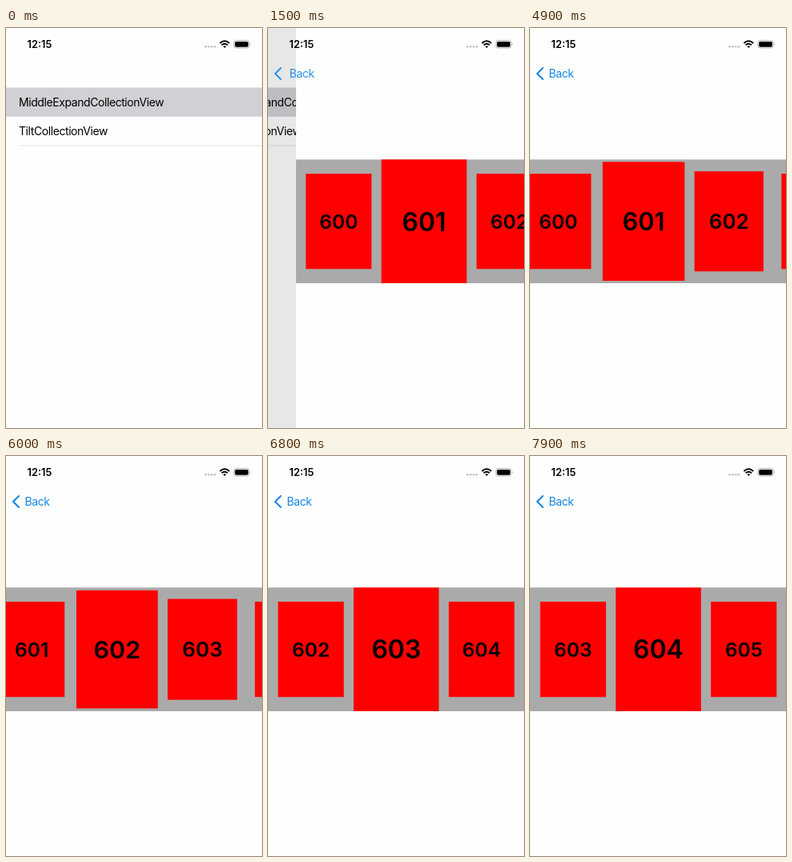
Write an HTML page that moves like this. It is 320 px wide and 500 px high and loops after 8 s.

```html
<!DOCTYPE html>
<html lang="en">
<head>
<meta charset="utf-8">
<title>Collection view demo</title>
<style>
  html, body { margin: 0; width: 100%; height: 100%; overflow: hidden; background: #fefefe; }
  svg { display: block; width: 320px; height: 500px; }
  text { font: 14px Inter, sans-serif; letter-spacing: -.42px; }
  .clock { font-size: 12.8px; font-weight: 600; letter-spacing: 0; }
  .card text { font-size: 32px; font-weight: 600; letter-spacing: 0; text-anchor: middle; }
  .card rect { fill: #f00; }
  .back { fill: #1486e6; }
</style>
</head>
<body>
<svg viewBox="0 0 320 500">
  <rect width="320" height="500" fill="#fefefe"/>
  <g id="menu">
    <rect y="74.5" width="320" height="36.3" fill="#d1d1d5"/>
    <rect x="16" y="146.5" width="304" height="1" fill="#e6e6e8"/>
    <text x="16" y="98">MiddleExpandCollectionView</text>
    <text x="16" y="134">TiltCollectionView</text>
  </g>
  <rect id="dim" width="320" height="500"/>
  <g id="page">
    <rect width="320" height="500" fill="#fefefe"/>
    <rect y="164.4" width="320" height="154.6" fill="#aaa"/>
    <g id="cards"></g>
  </g>
  <g id="nav" class="back">
    <path d="M16 50L9 57L16 64" fill="none" stroke="#1486e6" stroke-width="2" stroke-linecap="round" stroke-linejoin="round"/>
    <text id="label" x="23.5" y="62">Back</text>
  </g>
  <text class="clock" x="26.5" y="25">12:15</text>
  <g fill="#c4c4c6">
    <circle cx="249.5" cy="23.3" r="1.4"/><circle cx="253.3" cy="23.3" r="1.4"/>
    <circle cx="257.1" cy="23.3" r="1.4"/><circle cx="260.9" cy="23.3" r="1.4"/>
  </g>
  <g fill="none" stroke="#000" stroke-width="2">
    <path d="M267.4 18.9Q273.3 13.7 279.2 18.9M269.6 21.3Q273.3 18.1 277 21.3"/>
    <path d="M271.4 22.9Q273.3 21.4 275.2 22.9L273.3 24.9Z" fill="#000" stroke="none"/>
  </g>
  <rect x="284.9" y="15.6" width="19.2" height="9.4" rx="2.8" fill="none" stroke="#a8a8aa" stroke-width=".9"/>
  <rect x="286.2" y="16.9" width="16.6" height="6.8" rx="1.6"/>
  <path d="M305 18.8Q306.6 20.3 305 21.8Z" fill="#a8a8aa"/>
</svg>
<script>
const LOOP = 8000, STEP = 100, PITCH = 320 / 3, MID_Y = 241.7, HEIGHT = 154.6;
const get = id => document.getElementById(id);
const move = (el, x) => el.setAttribute('transform', `translate(${x})`);

// Start time in ms and stiffness of each one-card swipe
const swipes = [[4868, 23], [5909, 9], [7250, 11.5]];

const cards = [];
for (let n = 600; n <= 606; n++) {
  get('cards').insertAdjacentHTML('beforeend', `<g class="card">
    <rect x="${-PITCH / 2}" y="${-HEIGHT / 2}" width="${PITCH}" height="${HEIGHT}"/>
    <text y="11.8">${n}</text></g>`);
  cards.push({ n, el: get('cards').lastChild });
}

// Critically damped spring from 0 to 1
function spring(t, start, stiffness) {
  const x = Math.max(0, t - start) / 1000 * stiffness;
  const left = (1 + x) * Math.exp(-x);
  return left < .0005 ? 1 : 1 - left;
}

function draw(t) {
  const push = spring(t, 1250, 15.1);
  move(get('menu'), -96 * push);
  move(get('page'), 320 * (1 - push));
  move(get('label'), 30 * (1 - push));
  get('nav').setAttribute('opacity', push);
  get('dim').setAttribute('opacity', .1 * push);

  const center = swipes.reduce((sum, [start, k]) => sum + spring(t, start, k), 601);
  for (const { n, el } of cards) {
    const offset = n - center;
    const scale = 1 - .23 * Math.min(1, Math.abs(offset));
    el.setAttribute('transform', `translate(${160 + offset * PITCH} ${MID_Y}) scale(${scale})`);
  }
}

function tick() {
  const t = performance.now() % LOOP;
  draw(Math.floor(t / STEP) * STEP);
  requestAnimationFrame(tick);
}
tick();
</script>
</body>
</html>
```
